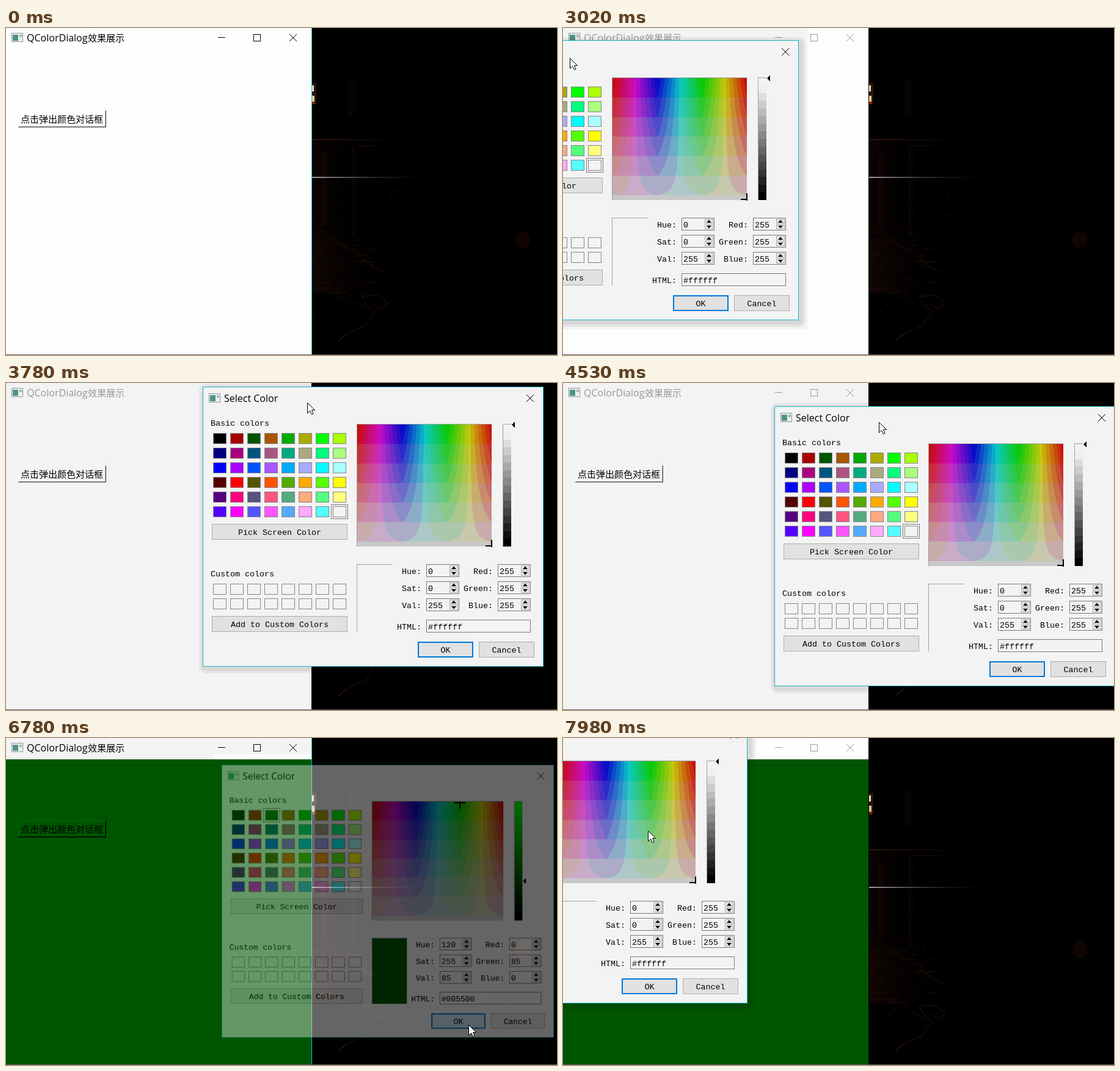
Write an HTML page with a canvas that moves like this. It is 902 px wide and 536 px high and loops after 8 s.

```html
<!DOCTYPE html>
<html lang="zh">
<head>
<meta charset="utf-8">
<title>QColorDialog</title>
<style>
html, body { margin: 0; width: 100%; height: 100%; overflow: hidden; background: #000; }
canvas { display: block; }
</style>
</head>
<body>
<canvas id="stage" width="902" height="536"></canvas>
<script>
const LOOP = 8000, W = 902, H = 536, DW = 558, DH = 459;
const MONO = '13.33px "Liberation Mono", monospace';
const UI = '16px "Open Sans", sans-serif';
const CJK = '15px "Noto Sans CJK SC", "Noto Sans CJK", sans-serif';
const TEAL = '#18b5c6', FACE = '#f3f3f3', GREEN = '#005500';
const PICK = 5690, ACCEPT = 6640;

const ctx = document.getElementById('stage').getContext('2d');
const layer = (w, h) => Object.assign(document.createElement('canvas'), { width: w, height: h }).getContext('2d');
const clamp = v => Math.max(0, Math.min(1, v));
const ramp = (t, a, b) => clamp((t - a) / (b - a));

// Positions as [time, x, y]; straight moves in between
const DIALOG = [[0, -256, -24], [2920, -256, -24], [3020, -172, 20], [3380, 272, 60],
  [3720, 322, 6], [3780, 322, 6], [4000, 338, 28], [4220, 346, 38]];
const POINTER = [[0, 182, 540], [520, 182, 540], [760, 165, 310], [940, 148, 185], [1080, 144, 151],
  [2080, 144, 151], [2300, 80, 80], [2500, 3, 11], [2550, -85, 2], [2920, -85, 2],
  [3020, 11, 49], [3380, 446, 77], [3720, 493, 32], [3780, 493, 32], [4000, 509, 54], [4220, 517, 64],
  [4530, 517, 64], [4770, 563, 241], [4980, 563, 241], [5600, 436, 123], [5850, 436, 123],
  [6220, 752, 480], [6330, 757, 470], [6800, 757, 470], [7100, 420, 290], [7400, 139, 152]];

function at(keys, t) {
  let i = keys.findIndex(k => k[0] > t);
  if (i < 0) i = keys.length;
  const a = keys[i - 1], b = keys[i] || a, p = a === b ? 0 : ramp(t, a[0], b[0]);
  return [1, 2].map(n => Math.round(a[n] + (b[n] - a[n]) * p));
}

function box(g, x, y, w, h, fill, line, lw = 1) {
  g.fillStyle = line;
  g.fillRect(x, y, w, h);
  g.fillStyle = fill;
  g.fillRect(x + lw, y + lw, w - 2 * lw, h - 2 * lw);
}

function rect(g, color, x, y, w, h) {
  g.fillStyle = color;
  g.fillRect(x, y, w, h);
}

function text(g, s, x, y, font = MONO, color = '#000', align = 'left') {
  g.font = font;
  g.fillStyle = color;
  g.textAlign = align;
  g.fillText(s, x, y);
}

function poly(g, pts, fill, line) {
  g.beginPath();
  pts.forEach(([x, y]) => g.lineTo(x, y));
  if (fill) { g.closePath(); g.fillStyle = fill; g.fill(); }
  if (line) { g.strokeStyle = line; g.lineWidth = 1; g.stroke(); }
}

function cross(g, x, y, color) {
  poly(g, [[x - 6, y - 6], [x + 6, y + 6]], null, color);
  poly(g, [[x - 6, y + 6], [x + 6, y - 6]], null, color);
}

function icon(g, x, y) {
  box(g, x, y, 19, 15, '#eef0f0', '#8d9696');
  rect(g, '#4f9487', x + 2, y + 3, 9, 10);
  rect(g, '#9fb4b8', x + 13, y + 3, 4, 4);
}

function rng(seed) {
  return () => (seed = (seed * 16807) % 2147483647) / 2147483647;
}

// Dim backdrop to the right of the window
const backdrop = (() => {
  const g = layer(W, H), rnd = rng(11);
  const fade = (color, x, y, w, h) => {
    const f = g.createLinearGradient(x, 0, x + w, 0);
    f.addColorStop(0, color);
    f.addColorStop(1, 'rgba(0,0,0,0)');
    rect(g, f, x, y, w, h);
  };
  rect(g, '#000', 0, 0, W, H);
  fade('#0d0302', 501, 184, 80, 170);
  fade('#120604', 501, 345, 110, 90);
  fade('#160706', 517, 205, 22, 120);
  fade('#100504', 566, 192, 14, 150);
  fade('#0c0403', 560, 85, 30, 60);
  for (let i = 0; i < 70; i++) {
    const x = 501 + rnd() * 95, y = 330 + rnd() * 110, d = 4 + rnd() * 16;
    poly(g, [[x, y], [x + d, y + d * (rnd() - .3)]], null, i % 4 ? '#160804' : '#260e06');
  }
  for (let i = 0; i < 50; i++) {
    const x = 645 + rnd() * 190, y = 445 - (x - 645) * rnd() * .5 - rnd() * 20;
    poly(g, [[x, y], [x + 14, y - 10 + rnd() * 20]], null, '#0b0403');
  }
  g.fillStyle = '#100503';
  g.beginPath();
  g.ellipse(846, 347, 12, 14, 0, 0, 7);
  g.fill();
  poly(g, [[515, 130], [520, 90], [545, 62]], null, '#0c0504');
  poly(g, [[625, 290], [632, 268], [655, 265], [705, 282]], null, '#120706');
  poly(g, [[580, 290], [632, 308], [640, 300]], null, '#120706');
  poly(g, [[501, 318], [555, 360], [625, 405]], null, '#1c0b07');
  poly(g, [[501, 428], [550, 428]], null, '#1e0c08');
  poly(g, [[505, 475], [548, 440], [600, 462]], null, '#1c0a06');
  poly(g, [[543, 514], [562, 499], [588, 488], [604, 464], [590, 452], [583, 440], [610, 438], [627, 452], [612, 460], [600, 452]], null, '#2a110a');
  poly(g, [[544, 513], [556, 502]], null, '#4a160f');
  fade('#32160e', 501, 182, 215, 2);
  fade('#1a0b07', 575, 192, 90, 2);
  fade('#c8c8c8', 501, 244, 200, 1);
  fade('#777', 501, 245, 215, 1);
  rect(g, '#2a1510', 501, 90, 7, 34);
  rect(g, '#f0dfb0', 501, 94, 3, 10);
  rect(g, '#e8c890', 501, 111, 4, 10);
  rect(g, '#a01810', 501, 122, 5, 3);
  return g.canvas;
})();

// Hue runs right to left, saturation bottom to top, channels in steps of 32
const spectrum = (() => {
  const g = layer(220, 200), img = g.createImageData(220, 200);
  for (let y = 0, i = 0; y < 200; y++) for (let x = 0; x < 220; x++) {
    const hue = 6 * (1 - x / 220), sat = 1 - y / 200;
    for (const n of [5, 3, 1]) {
      const k = (n + hue) % 6;
      const v = 200 - 200 * sat * Math.max(0, Math.min(k, 4 - k, 1));
      img.data[i++] = Math.min(200, (v >> 5) * 32 + 12);
    }
    img.data[i++] = 255;
  }
  g.putImageData(img, 0, 0);
  return g.canvas;
})();

function swatch(g, x, y, fill) {
  box(g, x, y, 22, 18, fill, '#85858f');
}

function button(g, x, y, w, label, fill = '#e1e1e1', line = '#adadad', lw = 1) {
  box(g, x, y, w, 26, fill, line, lw);
  text(g, label, x + w / 2, y + 18, MONO, '#000', 'center');
}

function spin(g, label, value, x, y) {
  text(g, label, x - 8, y + 16, MONO, '#000', 'right');
  box(g, x, y, 54, 21, FACE, '#7a7a7a');
  text(g, value, x + 3, y + 16);
  for (const d of [-1, 1]) {
    const by = d < 0 ? y + 2 : y + 11, cy = by + 4;
    box(g, x + 38, by, 14, 8, '#e6e6e6', '#b0b0b0');
    poly(g, [[x + 41, cy - d * 2], [x + 49, cy - d * 2], [x + 45, cy + d * 2.5]], '#000');
  }
}

const dlg = layer(DW, DH);
function paintDialog(green, hover) {
  const g = dlg;
  box(g, 0, 0, DW, DH, FACE, TEAL);
  icon(g, 10, 11);
  text(g, 'Select Color', 35, 25, UI);
  cross(g, 536, 19, '#000');

  text(g, 'Basic colors', 13, 64);
  for (let i = 0; i < 48; i++) {
    const b = i % 3, r = (i / 3 | 0) % 4, gr = i / 12 | 0;
    const fill = i === 47 ? FACE : `rgb(${r * 85},${gr * 85},${b * 255 >> 1})`;
    swatch(g, 17 + 28 * (i / 6 | 0), 76 + 24 * (i % 6), fill);
  }
  g.setLineDash([1, 1]);
  g.strokeStyle = '#000';
  g.lineWidth = 1;
  g.strokeRect(green ? 70.5 : 210.5, green ? 73.5 : 193.5, 27, 23);
  g.setLineDash([]);
  button(g, 15, 225, 222, 'Pick Screen Color');

  text(g, 'Custom colors', 13, 311);
  for (let i = 0; i < 16; i++) swatch(g, 17 + 28 * (i % 8), 323 + 24 * (i >> 3), FACE);
  button(g, 15, 376, 222, 'Add to Custom Colors');

  rect(g, '#a0a0a0', 252, 61, 221, 201);
  g.drawImage(spectrum, 253, 62);
  g.save();
  g.beginPath();
  g.rect(253, 62, 221, 201);
  g.clip();
  const mx = green ? 399 : 472, my = green ? 63 : 260;
  rect(g, '#000', mx - 9, my, 20, 2);
  rect(g, '#000', mx, my - 9, 2, 20);
  g.restore();

  rect(g, '#a0a0a0', 491, 61, 14, 201);
  for (let i = 0; i < 16; i++) {
    const v = Math.min(green ? 255 : 243, Math.round(255 * (1 - i / 15)));
    const y = 62 + Math.floor(i * 12.5);
    rect(g, green ? `rgb(0,${v},0)` : `rgb(${v},${v},${v})`, 492, y, 13, 62 + Math.floor((i + 1) * 12.5) - y);
  }
  const ay = green ? 195.5 : 62.5;
  poly(g, [[506, ay], [511, ay - 5], [511, ay + 5]], '#000');

  rect(g, '#a0a0a0', 252, 291, 59, 111);
  rect(g, green ? GREEN : FACE, 253, 292, 58, 110);

  const vals = green ? ['120', '255', '85', '0', '85', '0'] : ['0', '0', '255', '255', '255', '255'];
  ['Hue:', 'Sat:', 'Val:', 'Red:', 'Green:', 'Blue:'].forEach((s, i) =>
    spin(g, s, vals[i], i < 3 ? 366 : 483, 291 + 28 * (i % 3)));
  text(g, 'HTML:', 358, 398, MONO, '#000', 'right');
  box(g, 366, 382, 171, 21, FACE, '#7a7a7a');
  text(g, green ? GREEN : '#ffffff', 369, 398);
  button(g, 352, 418, 91, 'OK', hover ? '#cfe8f6' : '#e1e1e1', '#0078d7', 2);
  button(g, 452, 418, 91, 'Cancel');
}

function paintWindow(t, active, dx, dy) {
  const green = t >= ACCEPT, ink = active ? '#000' : '#999';
  rect(ctx, '#fefefe', 0, 0, 500, H);
  if (!active && !green) {
    // The dimmed area grows with the dialog's reach
    if (t < 3100) rect(ctx, '#f3f3f3', 0, 0, Math.min(500, dx + DW + 14), dy + DH + 15);
    else rect(ctx, '#f3f3f3', 0, 0, 500, H);
    if (t >= 3100 && t < 3720) {
      rect(ctx, '#fefefe', 400, 0, 100, 8);
      rect(ctx, '#fefefe', 450, 8, 50, 23);
    }
  }
  if (green) {
    if (t < 7400) {
      rect(ctx, FACE, 0, 0, 500, 35);
      rect(ctx, '#fefefe', 340, 27, 160, 8);
    } else if (!active) rect(ctx, FACE, 0, 0, 316, 35);
    rect(ctx, GREEN, 0, 35, 500, H - 35);
  }
  if (active) rect(ctx, TEAL, 500, 0, 1, H - 1);

  icon(ctx, 9, 8);
  text(ctx, 'QColorDialog', 34, 22, UI, ink);
  text(ctx, '效果展示', 134, 22, CJK, ink);
  rect(ctx, ink, 347, 15, 12, 1);
  ctx.strokeStyle = ink;
  ctx.lineWidth = 1;
  ctx.strokeRect(405.5, 10.5, 11, 11);
  cross(ctx, 470, 16, ink);

  const down = (t >= 1450 && t < 1540) || (t >= 7650 && t < 7730);
  const dark = green ? '#000' : '#555', soft = green ? '#002a00' : '#a0a0a0';
  const lit = green ? '#0a640a' : '#f6f6f6', o = down ? 1 : 0;
  rect(ctx, down ? lit : dark, 20, 135, 144, 28);
  rect(ctx, down ? dark : lit, 20, 135, 143, 27);
  rect(ctx, soft, 21, 136, 142, 26);
  rect(ctx, green ? GREEN : active ? '#fefefe' : FACE, 21 + o, 136 + o, 141, 25);
  text(ctx, '点击弹出颜色对话框', 24 + o, 155 + o, CJK);
}

function showDialog(x, y, alpha, scale) {
  ctx.save();
  ctx.globalAlpha = alpha;
  ctx.translate(x + DW / 2, y + DH / 2);
  ctx.scale(scale, scale);
  ctx.translate(-DW / 2, -DH / 2);
  if (alpha === 1) {
    for (const [out, a] of [[11, .06], [7, .06]]) {
      ctx.fillStyle = `rgba(0,0,0,${a})`;
      ctx.beginPath();
      ctx.roundRect(5 - out, 6 - out, DW + 2 * out - 5, DH + 2 * out - 6, out);
      ctx.fill();
    }
  }
  ctx.drawImage(dlg.canvas, 0, 0);
  ctx.restore();
}

function paintPointer(x, y) {
  poly(ctx, [[0, 0], [0, 17], [4, 13], [7, 19], [9.5, 18], [7, 12], [12, 12], [0, 0]]
    .map(p => [x + .5 + p[0], y + .5 + p[1]]), '#fff', '#000');
}

function frame(now) {
  const t = now % LOOP, second = t >= 7400;
  const [dx, dy] = at(DIALOG, second ? 0 : t);
  const [px, py] = at(POINTER, t);
  const opening = second ? ramp(t, 7760, 7970) : ramp(t, 1570, 1820);
  const closing = second ? 0 : ramp(t, ACCEPT, 6880);
  const active = opening === 0 || closing > 0;

  ctx.drawImage(backdrop, 0, 0);
  paintWindow(t, active, dx, dy);
  rect(ctx, '#665f63', 0, H - 1, W, 1);
  if (opening > 0 && closing < 1) {
    const hover = px >= dx + 352 && px < dx + 443 && py >= dy + 418 && py < dy + 444;
    paintDialog(!second && t >= PICK, hover || closing > 0);
    const ease = 1 - (1 - opening) ** 2;
    showDialog(dx, dy, ease * (1 - closing), (.92 + .08 * ease) * (1 - .043 * closing));
  }
  paintPointer(px, py);
}

let start;
function tick(now) {
  start ??= now;
  frame(Math.max(0, now - start));
  requestAnimationFrame(tick);
}
frame(0);
requestAnimationFrame(tick);
</script>
</body>
</html>
```
